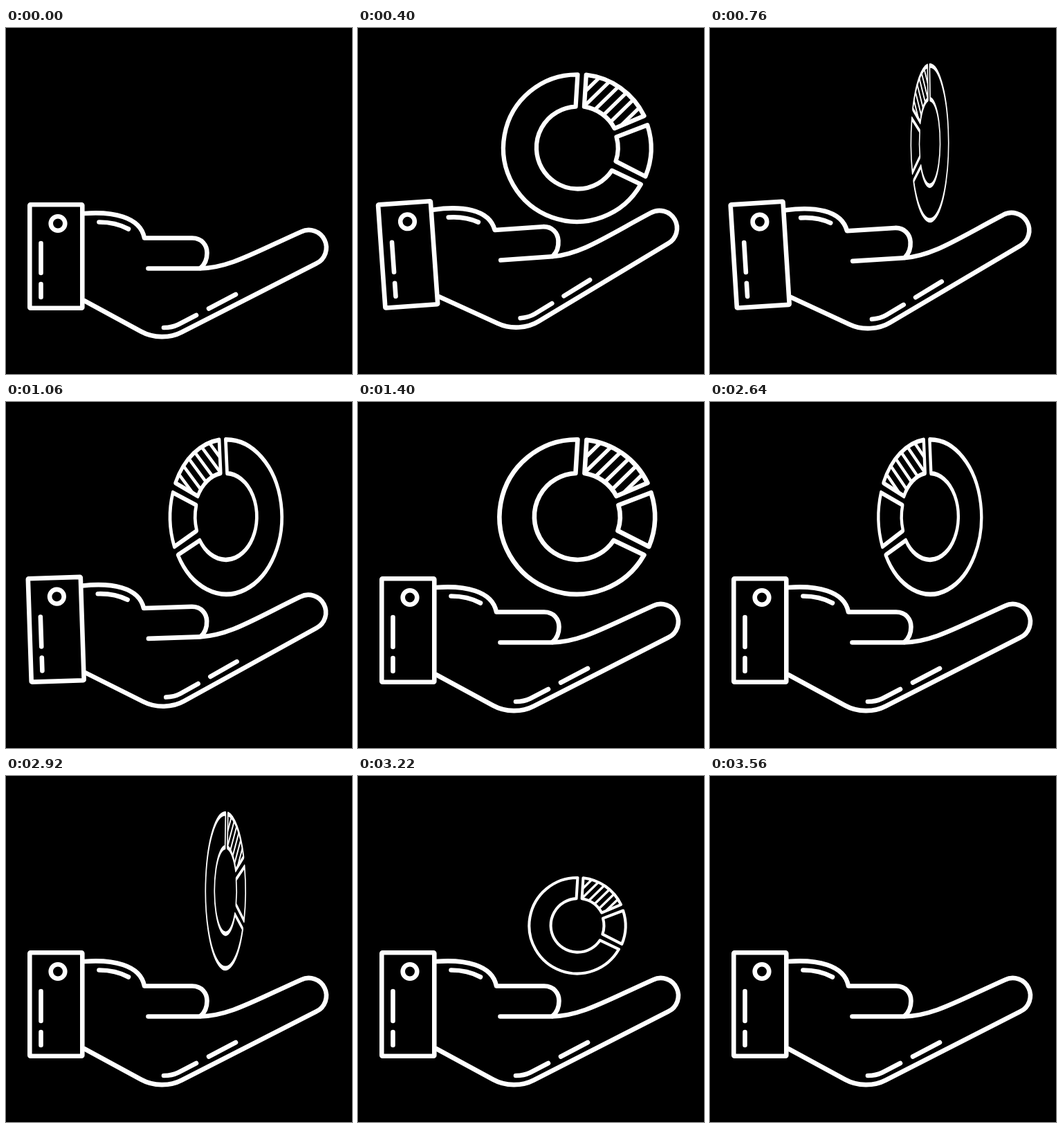
An HTML page for the animation above (3.62 s loop, 500 by 500 pixels).

```html
<!DOCTYPE html>
<html lang="en">
<head>
<meta charset="utf-8">
<title>Chart in hand</title>
<style>
  html, body { margin: 0; width: 100%; height: 100%; overflow: hidden; background: #000; }
  svg { display: block; width: 100vw; height: 100vh; }
  g { fill: none; stroke: #fff; stroke-width: 6.6; stroke-linecap: round; stroke-linejoin: round; }
</style>
</head>
<body>
<svg viewBox="0 0 500 500">
  <defs>
    <path id="slice" d="M13 -111.3A112 112 0 0 1 101 -49L56 -30A63 63 0 0 0 10 -63Z"/>
    <clipPath id="inside"><use href="#slice"/></clipPath>
  </defs>
  <g id="hand">
    <rect x="34.3" y="255.3" width="76" height="149.4" rx="1"/>
    <circle cx="75" cy="282.5" r="10.3"/>
    <path d="M50.5 311V354M50.5 370V389"/>
    <path d="M113 268C153 265 194 272 200 303.500H269C283 303.500 290.500 314 290.500 325C290.500 335 287 342 281 347"/>
    <path d="M205.500 347.500H280C322 347 358 325 426.500 294.500A25 25 0 0 1 448.500 340.300L254 439.500C237 448.500 213 448.500 195 438.500L113 394"/>
    <path d="M134.500 280.500C150 280.500 165 284 177 290.500"/>
    <path d="M228 433C238 433 243 431.500 249 428.500L275 415M293 405.500L332 385"/>
  </g>
  <g id="chart">
    <path d="M0 -111.700A111.700 111.700 0 1 0 96 55L52 34A62.500 62.500 0 1 1 -3 -63Z"/>
    <use href="#slice"/>
    <path d="M106 -35A112 112 0 0 1 103 43L58 20A62 62 0 0 0 59 -17Z"/>
    <path id="hatch" clip-path="url(#inside)" stroke-width="5.500"/>
  </g>
</svg>
<script>
  const LOOP = 3620, STEP = 20;
  const RISE = 500, SETTLE = 1400, TURN = 2400, SINK = 3057, GONE = 3560;
  const TOP = 166, PALM = 321;
  const hand = document.getElementById('hand');
  const chart = document.getElementById('chart');

  let stripes = '';
  for (let i = 0; i < 6; i++) stripes += `M0 ${21 * i - 75}l120 -117`;
  document.getElementById('hatch').setAttribute('d', stripes);

  const part = (t, from, to) => Math.min(1, Math.max(0, (t - from) / (to - from)));

  function draw(t) {
    const rise = part(t, 0, RISE);
    const sink = part(t, SINK, GONE);
    const tilt = -5 * (rise - part(t, RISE, SETTLE));
    hand.setAttribute('transform', `rotate(${tilt} 34 331)`);

    // The chart pops up, flips once, waits, flips again and sinks.
    const pop = Math.sin(rise * Math.PI / 2);
    const turns = part(t, RISE, SETTLE) + part(t, TURN, SINK);
    const size = pop * Math.pow(1 - sink, 1.22);
    const y = PALM + (TOP - PALM) * pop * (1 - sink);
    const flip = Math.cos(turns * 2 * Math.PI);
    chart.setAttribute('transform', `translate(317.4 ${y}) scale(${size * flip} ${size})`);
    chart.setAttribute('visibility', size > 0 ? 'visible' : 'hidden');
  }

  const start = performance.now();
  function tick() {
    const t = (performance.now() - start) % LOOP;
    draw(Math.floor(t / STEP) * STEP);
    requestAnimationFrame(tick);
  }
  tick();
</script>
</body>
</html>
```
